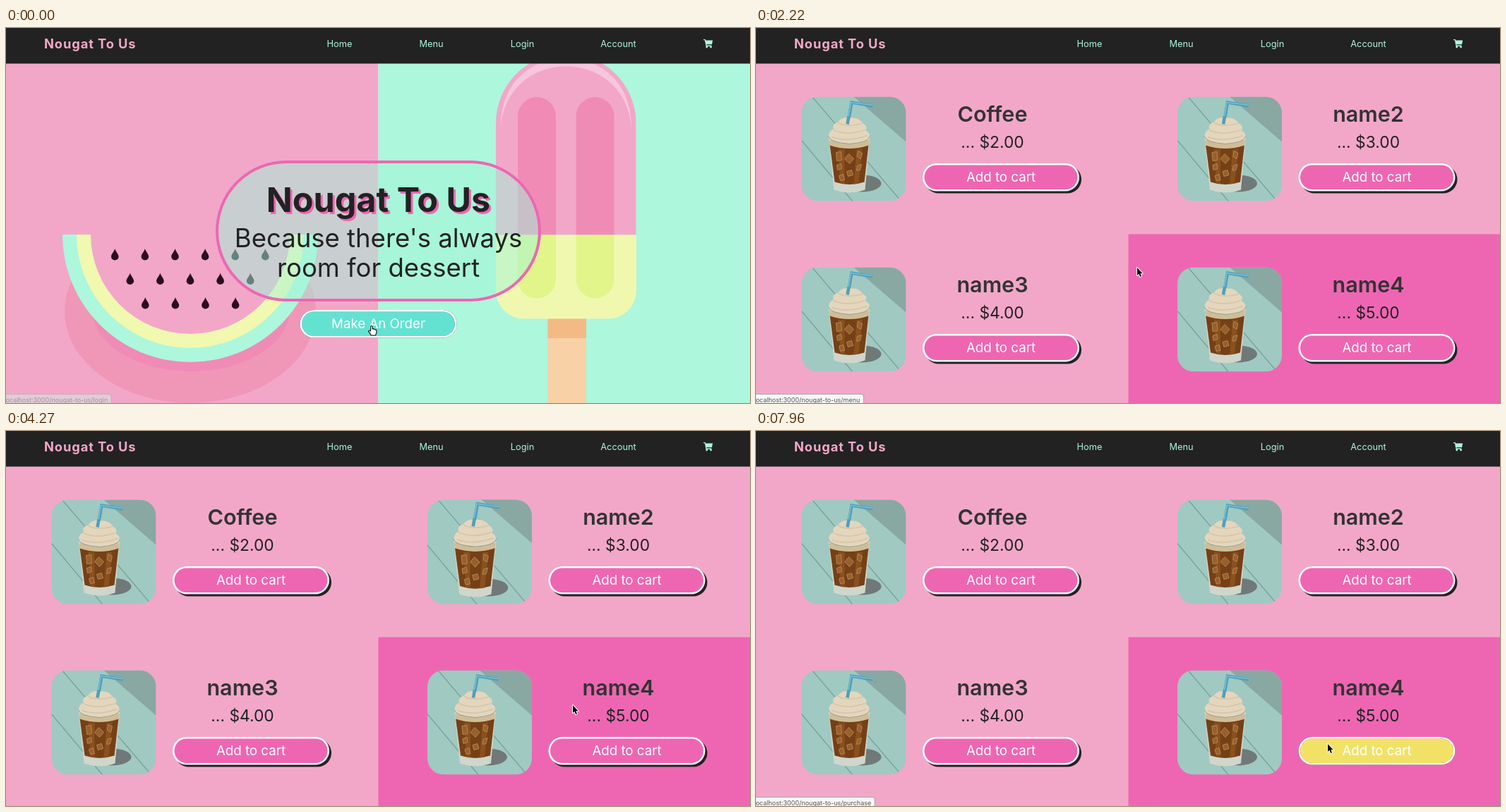
Animation, 1054 px wide and 532 px high, one loop 8 s. Source, as an HTML page with a canvas:

```html
<!DOCTYPE html>
<html lang="en">
<head>
<meta charset="utf-8">
<title>Dessert shop</title>
<style>
html, body { margin: 0; height: 100%; overflow: hidden; }
canvas { display: block; }
</style>
</head>
<body>
<canvas id="stage" width="1054" height="532"></canvas>
<script>
const ctx = document.getElementById('stage').getContext('2d');
const LOOP = 8000, TICK = 147.4;
const SHOP = 'Nougat To Us', SLUG = 'nougat-to-us';
const DARK = '#222', PINK = '#f2a7c8', HOT = '#ee66b2', MINT = '#9cf0d8',
      YELLOW = '#f1e267', AQUA = '#63e2d2', ROSE = '#f08bb6', PALE = '#adf7dc';

// Pointer path: tick, x, y
const POINTER = [
  [4, 517, 421], [11, 540, 340], [16, 540, 340], [19, 474, 260], [20, 440, 280],
  [22, 330, 360], [24, 400, 330], [25, 500, 230], [26, 640, 180], [27, 740, 230],
  [28, 790, 320], [29, 803, 389], [31, 815, 410], [33, 830, 450], [35, 820, 455],
  [37, 760, 440], [38, 725, 425], [40, 731, 430], [42, 760, 440], [43, 760, 440],
  [44, 790, 445], [45, 764, 440], [46, 764, 440], [47, 735, 435], [49, 752, 438],
  [50, 752, 438], [51, 775, 440], [54, 810, 444]
];

function pointerAt(k) {
  const i = POINTER.findIndex(p => p[0] >= k);
  const b = POINTER[i], a = POINTER[Math.max(0, i - 1)];
  const f = a === b ? 0 : (k - a[0]) / (b[0] - a[0]);
  return [a[1] + (b[1] - a[1]) * f, a[2] + (b[2] - a[2]) * f];
}

function inside(k, x, y, w, h) {
  const [px, py] = pointerAt(k);
  return px >= x && px < x + w && py >= y && py < y + h;
}

// Hover amount 0..1, fading over three ticks
const hover = (k, from, ...box) =>
  [0, 1, 2].filter(d => k - d >= from && inside(k - d, ...box)).length / 3;

function rect(color, x, y, w, h, r = 0) {
  ctx.fillStyle = color;
  ctx.beginPath();
  ctx.roundRect(x, y, w, h, r);
  ctx.fill();
}

function ellipse(color, x, y, rx, ry = rx, start = 0, end = 2 * Math.PI) {
  ctx.fillStyle = color;
  ctx.beginPath();
  ctx.ellipse(x, y, rx, ry, 0, start, end);
  ctx.fill();
}

function path(d, fill, stroke, width = 1) {
  const p = new Path2D(d);
  if (fill) { ctx.fillStyle = fill; ctx.fill(p); }
  if (stroke) { ctx.strokeStyle = stroke; ctx.lineWidth = width; ctx.stroke(p); }
}

function text(str, x, y, size, color = DARK, weight = 400, align = 'center') {
  ctx.font = `${weight} ${size}px Inter, sans-serif`;
  ctx.textAlign = align;
  ctx.fillStyle = color;
  ctx.fillText(str, x, y);
}

function title(str, y, size) {
  text(str, 530.5, y + 3, size, HOT, 700);
  text(str, 527.5, y, size, DARK, 700);
}

function at(x, y, draw) {
  ctx.save();
  ctx.translate(x, y);
  draw();
  ctx.restore();
}

function button(label, x, y, amount, hoverColor) {
  const off = 3 * (1 - amount);
  rect(DARK, x + off, y + off, 222, 39.5, 20);
  rect('#fff', x, y, 222, 39.5, 20);
  rect(HOT, x + 2.5, y + 2.5, 217, 34.5, 17.5);
  ctx.globalAlpha = amount;
  rect(hoverColor, x + 2.5, y + 2.5, 217, 34.5, 17.5);
  ctx.globalAlpha = 1;
  text(label, x + 111, y + 25.5, 18.7, '#fff');
}

function nav() {
  rect(DARK, 0, 0, 1054, 50.5);
  ctx.letterSpacing = '0.9px';
  text(SHOP, 54, 29, 18.3, PINK, 700, 'left');
  ctx.letterSpacing = '0px';
  [['Home', 472.5], ['Menu', 602.5], ['Login', 731.5], ['Account', 867.5]]
    .forEach(([label, x]) => text(label, x, 27, 12.8, PALE));
  at(988, 16, () => {
    path('M0 0H2.8L3.2 1.6H13.2L12 7.2H4.4L4.7 8.6H11.6L11.3 9.9H3.6L1.9 1.3H0Z', PALE);
    ellipse(PALE, 4.8, 11, 1.4);
    ellipse(PALE, 10.6, 11, 1.4);
  });
}

function watermelon() {
  ellipse('#f097b8', 261, 402, 178, 130, -0.5, Math.PI + 0.5);
  ellipse(ROSE, 262, 400, 140, 87, 0, Math.PI);
  [[181, PALE], [161, '#f1f8b0'], [141, PINK]]
    .forEach(([r, color]) => ellipse(color, 261, 293, r, r, 0, Math.PI));
  for (let row = 0; row < 3; row++)
    for (let i = 0; i < 6 - row; i++)
      at(154.3 + row * 21.5 + i * 42.6, 321 + row * 34.5, () =>
        path('M0 -8C1 -4 5.3 0 5.3 3.4A5.3 5 0 0 1 -5.3 3.4C-5.3 0 -1 -4 0 -8Z', '#2b0e1c'));
}

function popsicle() {
  rect('#f9d1a6', 767.5, 400, 54.5, 132);
  rect('#f3ba86', 767.5, 400, 54.5, 40);
  rect(PINK, 694, 36, 198.5, 257.5, [99, 99, 0, 0]);
  rect('#f0f8b0', 694, 293.5, 199, 119, [0, 0, 40, 40]);
  path('M701 140C701 10 886 10 886 140C876 26 711 26 701 140Z', '#f7c5dc');
  for (const x of [725, 807.5]) {
    rect(ROSE, x, 98, 54, 195.5, [27, 27, 0, 0]);
    rect('#e2f58a', x, 293.5, 54, 90, [0, 0, 27, 27]);
  }
}

function home() {
  rect(PINK, 0, 50, 527.5, 482);
  rect(PALE, 527.5, 50, 526.5, 482);
  watermelon();
  popsicle();
  rect('rgba(162,245,218,.5)', 297, 188, 461, 200, 100);
  ctx.strokeStyle = HOT;
  ctx.lineWidth = 4;
  ctx.beginPath();
  ctx.roundRect(299, 190, 457, 196, 98);
  ctx.stroke();
  title(SHOP, 261, 48.5);
  text("Because there's always", 527.5, 311, 36.5);
  text('room for dessert', 527.5, 352.5, 36.5);
  button('Make An Order', 416.5, 400, 1, AQUA);
}

function login(k) {
  rect(YELLOW, 0, 50, 1054, 107.5);
  rect(PINK, 0, 157.5, 1054, 269.5);
  rect(MINT, 0, 427, 1054, 105);
  title('Login', 221.5, 36.5);
  ['Email', 'Password'].forEach((label, i) => {
    rect('#f8cfe0', 416.5, 248 + 40 * i, 222, 28, 14);
    text(label, 527.5, 267.5 + 40 * i, 15, '#7d6d76');
  });
  button('Login', 416.5, 328, hover(k, 3, 416, 328, 222, 40), AQUA);
  text('Need to Sign-Up?', 527.5, 392, 12.4);
}

// Iced coffee picture, 148 by 148
function coffee(zoom) {
  ctx.beginPath();
  ctx.roundRect(0, 0, 148, 148, 23);
  ctx.clip();
  ctx.translate(74, 74);
  ctx.scale(zoom, zoom);
  ctx.translate(-74, -74);
  rect('#a0c9c1', 0, 0, 148, 148);
  path('M74 0H148V64Z', '#89a8a2');
  path('M15 0L141 148M0 62L72 148', null, '#76a099', 1.2);
  ellipse('#707977', 86, 123, 27, 12);
  path('M38 56L46 132Q68 140 90 132L97 56Z', '#d0d6cb');
  path('M40 68L47 121Q68 128 89 121L95 68Z', '#754016');
  path('M52 74L55 122L61 124V75ZM78 75L74 124L81 123L86 74Z', '#8a501e');
  path('M39 62L40 69Q68 78 95 69L96 62Z', '#d0bd98');
  path('M49 79L56 78 57 90 50 91ZM61 88L67 81 74 88 68 95ZM80 77L86 80 84 88 79 85Z' +
       'M50 97L56 95 57 102 51 104ZM64 106L71 104 73 111 66 113ZM79 98L85 96 83 104 78 105Z' +
       'M53 112L59 110 61 118 55 119Z', '#96602c', '#b88b58', 0.9);
  path('M65 42L71 8L101 13', null, '#4f9fbc', 4.5);
  path('M64 42L70 8L101 12', null, '#7bc0d3', 1.5);
  path('M39 59Q37 50 45 46Q43 38 52 36Q57 28 67 30Q81 28 87 38Q94 41 91 48' +
       'Q98 51 96 60Q82 68 68 67Q50 67 39 59Z', '#e4d6bd');
  path('M45 47Q64 56 90 47M52 37Q65 44 86 38M43 57Q65 65 93 55', null, '#d5c5a8', 1.6);
  path('M38 56Q40 65 68 67Q95 65 97 56', null, '#8d9d92', 1);
  path('M65 39L67 28', null, '#4f9fbc', 4.5);
}

function menu(k) {
  rect(PINK, 0, 50, 1054, 482);
  ['Coffee', 'name2', 'name3', 'name4'].forEach((name, i) => {
    const col = i % 2, row = i >> 1, dx = col * 532.5, dy = row * 242;
    const cell = [col * 527.5, 50.5 + dy, 527.5, 242];
    if (inside(k, ...cell)) rect(HOT, ...cell);
    const zoom = 1 + 0.1 * hover(k, 15, 64.5 + dx, 98 + dy, 148, 148);
    at(64.5 + dx, 97.5 + dy, () => coffee(zoom));
    text(name, 335 + dx, 132.5 + dy, 30.5, '#333', 600);
    text(`... $${i + 2}.00`, 335 + dx, 170 + dy, 22.8);
    button('Add to cart', 236 + dx, 192 + dy, cartHover(k, dx, dy), YELLOW);
  });
}

const cartHover = (k, dx, dy) => hover(k, 15, 236 + dx, 192 + dy, 222, 40);

function status(page, alpha) {
  const url = `localhost:3000/${SLUG}/${page}`;
  ctx.globalAlpha = alpha;
  ctx.font = '400 9px Inter, sans-serif';
  const w = ctx.measureText(url).width + 3;
  rect('#a9a9a9', -6, 519, w + 6, 20, 4);
  rect('#f7f7f7', -6, 520, w + 5, 20, 3);
  text(url, -2.5, 530.5, 9, '#555', 400, 'left');
  ctx.globalAlpha = 1;
}

function pointer(k, hand) {
  at(...pointerAt(k), () => {
    ctx.lineJoin = 'round';
    if (hand)
      path('M-.5 7V2.5Q.8 0 2 2.5V6Q3.5 5 4.3 6.5Q5.8 5.7 6.3 7.2Q8 6.7 8 8.5' +
           'Q8 12 6.5 15H0Q-1 12 -3.5 9.5Q-3.5 7.2 -.5 9Z', '#fff', '#111', 1.1);
    else {
      const arrow = 'M0 0V11L2.4 8.8 4.2 13 6 12.2 4.3 8.2H7.6Z';
      path(arrow, null, '#fff', 2);
      path(arrow, '#000');
    }
  });
}

function draw(k) {
  let hand = false;
  if (k < 3) {
    home();
    status('login', k ? 1 : 0.45);
    hand = k < 1;
  } else if (k < 15) {
    login(k);
    const over = hover(k, 3, 416, 328, 222, 40);
    if (over) status('menu', over);
    else if (k < 6) status('login', k < 5 ? 1 : 0.5);
    hand = over > 0 && k < 14;
  } else {
    menu(k);
    const over = cartHover(k, 532.5, 242);
    if (k < 17) status('menu', 1);
    else if (over) status('purchase', over);
    hand = k < 54 && inside(k, 768.5, 434, 222, 40);
  }
  nav();
  pointer(k, hand);
}

function frame(now) {
  draw(Math.min(54, Math.floor((now % LOOP + 8) / TICK)));
  requestAnimationFrame(frame);
}
requestAnimationFrame(frame);
</script>
</body>
</html>
```
